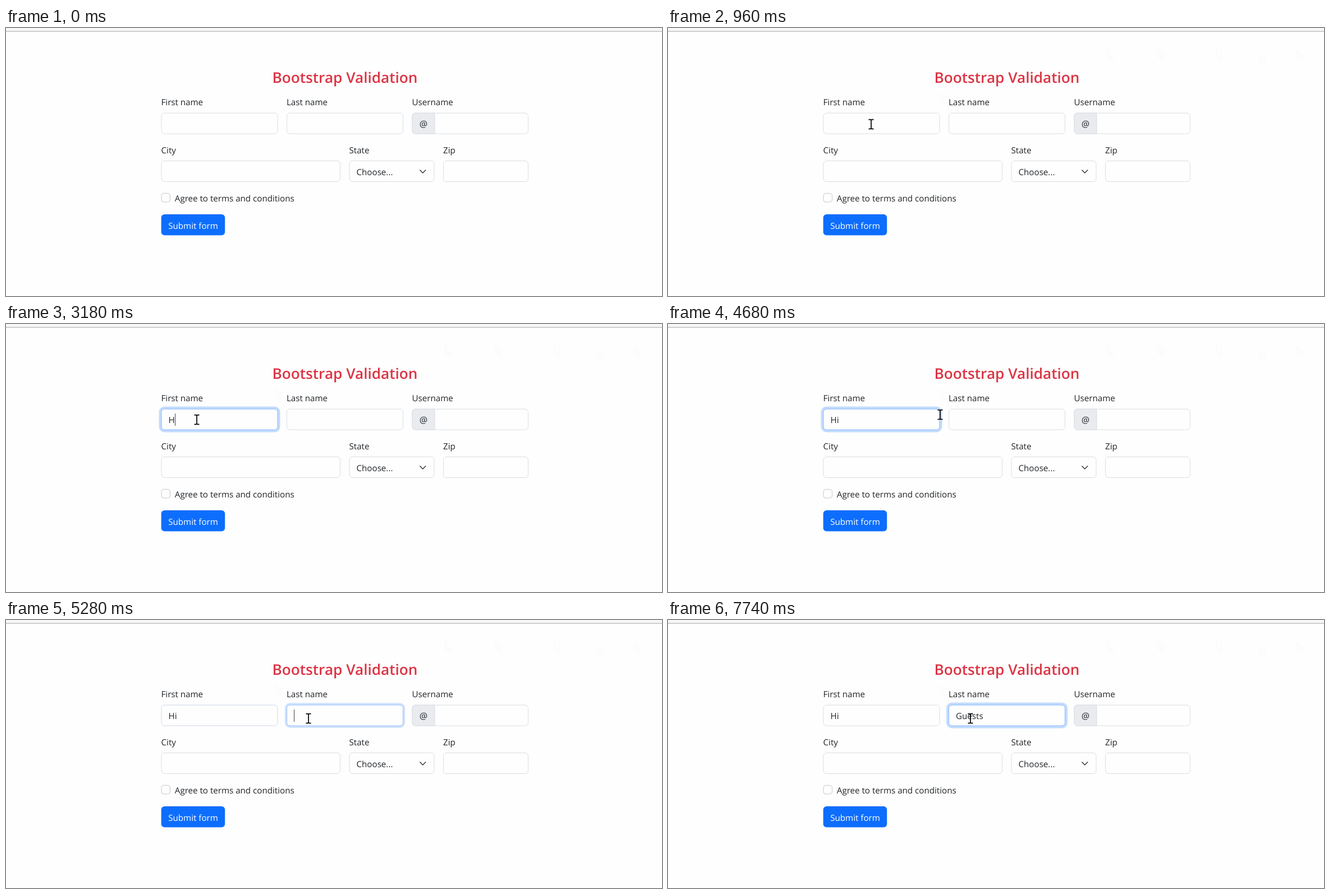
An HTML page that plays this animation: 1169x479 px, repeating every 8000 ms.

```html
<!DOCTYPE html>
<html lang="en">
<head>
<meta charset="utf-8">
<title>Form validation</title>
<style>
  html, body { margin: 0; width: 100%; height: 100%; overflow: hidden; background: #fefefe; }
  svg { display: block; width: 1169px; height: 479px; }
  text { font: 15.15px "Open Sans", "Noto Sans", sans-serif; fill: #212529; white-space: pre; text-rendering: geometricPrecision; }
  .title { font-size: 26.2px; font-weight: 600; fill: #dc3545; }
  .mid { text-anchor: middle; }
  .box { fill: #fefefe; stroke: #d9dde1; }
  .ring { fill: #c2dbfe; }
  .line { fill: none; stroke: #000; }
</style>
</head>
<body>
<svg viewBox="0 0 1169 479">
  <defs>
    <path id="arrow" d="M0 0V16.5L3.8 13 6.4 19 9 18 6.5 12H11.8Z"/>
  </defs>
  <rect width="1169" height="6" fill="#f7f7f7"/>
  <rect y="5.5" width="1169" height="1" fill="#a4a4a4"/>
  <g id="trail" fill="none" stroke="#f8f8f8"></g>

  <text class="title mid" x="604" y="98">Bootstrap Validation</text>
  <g id="form"></g>

  <path d="M764 152H729.5a5.5 5.5 0 0 0-5.5 5.5v26a5.5 5.5 0 0 0 5.5 5.5H764Z" fill="#e9ebef" stroke="#d9dde1"/>
  <text class="mid" x="744" y="177" style="font-size:16px">@</text>
  <text x="624.5" y="263">Choose...</text>
  <path class="line" d="M737.8 254l5 5 5-5" style="stroke:#343a40" stroke-width="1.5" stroke-linecap="round" stroke-linejoin="round"/>
  <rect class="box" x="277" y="295.5" width="15.5" height="15.5" rx="4" style="stroke:#c3c7cb"/>
  <text x="300.8" y="309.5">Agree to terms and conditions</text>
  <rect x="276.6" y="333" width="113.6" height="37.6" rx="6" fill="#0d6efd"/>
  <text class="mid" x="333.5" y="359" style="fill:#fff">Submit form</text>

  <rect id="caret" y="160" width="1" height="22" fill="#444"/>
  <use id="hand" href="#arrow" fill="#fff" stroke="#000"/>
  <path id="beam" class="line" stroke-width="1.7" d="M-4.5-8.3h3.3l1.2 1 1.2-1h3.3M0-7.5v15M-4.5 8.3h3.3l1.2-1 1.2 1h3.3"/>
</svg>
<script>
const LOOP = 8000, STEP = 60, BLINK = 500, FADE = 150;
const $ = id => document.getElementById(id);

function add(parent, tag, attrs, text = '') {
  const el = document.createElementNS('http://www.w3.org/2000/svg', tag);
  for (const k in attrs) el.setAttribute(k, attrs[k]);
  el.textContent = text;
  return parent.appendChild(el);
}

function field(label, x, y, width) {
  add($('form'), 'text', { x: x - .5, y: y - 14 }, label);
  const ring = add($('form'), 'rect', { class: 'ring' });
  const box = add($('form'), 'rect', { class: 'box', x, y, width, height: 37, rx: 5.5 });
  const value = add($('form'), 'text', { x: x + 12.5, y: y + 25 });
  return { x, y, width, ring, box, value };
}

const first = field('First name', 277, 152, 207);
const last = field('Last name', 500.5, 152, 207);
field('Username', 724, 152, 206.5);
field('City', 277, 237.5, 318.5);
field('State', 612, 237.5, 151);
field('Zip', 779.5, 237.5, 151);

// caret: moment of the click; keys: moment of each typed letter
Object.assign(first, { word: 'Hi', caret: 1300, glow: 1335, blur: 5160, keys: [3180, 3700] });
Object.assign(last, { word: 'Guests', caret: 5200, glow: 5175, blur: LOOP, keys: [6060, 6480, 6660, 6840, 6960, 7200] });

// pointer stops: time, x, y
const path = [
  [300, 1121, 40], [360, 1054, 47], [420, 977, 38], [480, 873, 37], [540, 783, 39],
  [660, 600, 82], [780, 481, 116], [840, 430, 140], [900, 390, 160], [960, 362, 172],
  [1080, 349, 172], [1200, 340, 171], [4440, 340, 171], [4680, 485, 162],
  [4860, 530, 168], [5100, 539, 176], [LOOP, 539, 176]
];
const ghosts = path.filter(([t]) => t < 800 && t !== 660).map(([t, x, y]) =>
  ({ t, el: add($('trail'), 'use', { href: '#arrow', x, y }) }));

const clamp = v => Math.max(0, Math.min(1, v));
const smooth = v => v * v * (3 - 2 * v);
const show = (el, on) => el.setAttribute('visibility', on ? 'visible' : 'hidden');

function pointerAt(t) {
  const i = Math.max(1, path.findIndex(p => p[0] >= t));
  const [t0, x0, y0] = path[i - 1], [t1, x1, y1] = path[i];
  const k = clamp((t - t0) / (t1 - t0));
  return [x0 + (x1 - x0) * k, y0 + (y1 - y0) * k];
}

function drawField(f, t) {
  const p = smooth(clamp((t - f.glow) / FADE)) * (1 - smooth(clamp((t - f.blur) / FADE)));
  const out = .5 + 4 * p;
  const geometry = {
    x: f.x - out, y: f.y - out, width: f.width + 2 * out, height: 37 + 2 * out,
    rx: 5.5 + out, opacity: p
  };
  for (const k in geometry) f.ring.setAttribute(k, geometry[k]);
  f.box.style.stroke = `color-mix(in srgb, #86b7fe ${p * 100}%, #d9dde1)`;
  f.value.textContent = f.word.slice(0, f.keys.filter(k => k <= t).length);
}

function drawCaret(t) {
  const f = t < last.caret ? first : last;
  const since = Math.max(...[f.caret, ...f.keys].filter(k => k <= t));
  show($('caret'), t >= f.caret && Math.floor((t - since) / BLINK) % 2 === 0);
  $('caret').setAttribute('x', Math.floor(f.x + 13 + f.value.getComputedTextLength()));
}

function drawPointer(t) {
  const [x, y] = pointerAt(t);
  const inside = [first, last].some(f =>
    x > f.x - 1 && x < f.x + f.width + 2 && y > f.y && y < f.y + 37);
  show($('beam'), t >= 300 && inside);
  show($('hand'), t >= 300 && !inside);
  for (const id of ['beam', 'hand']) $(id).setAttribute('transform', `translate(${x} ${y})`);
  for (const g of ghosts) show(g.el, t > g.t);
}

function frame(now) {
  const t = Math.floor(now % LOOP / STEP) * STEP;
  drawField(first, t);
  drawField(last, t);
  drawCaret(t);
  drawPointer(t);
  requestAnimationFrame(frame);
}
requestAnimationFrame(frame);
</script>
</body>
</html>
```
